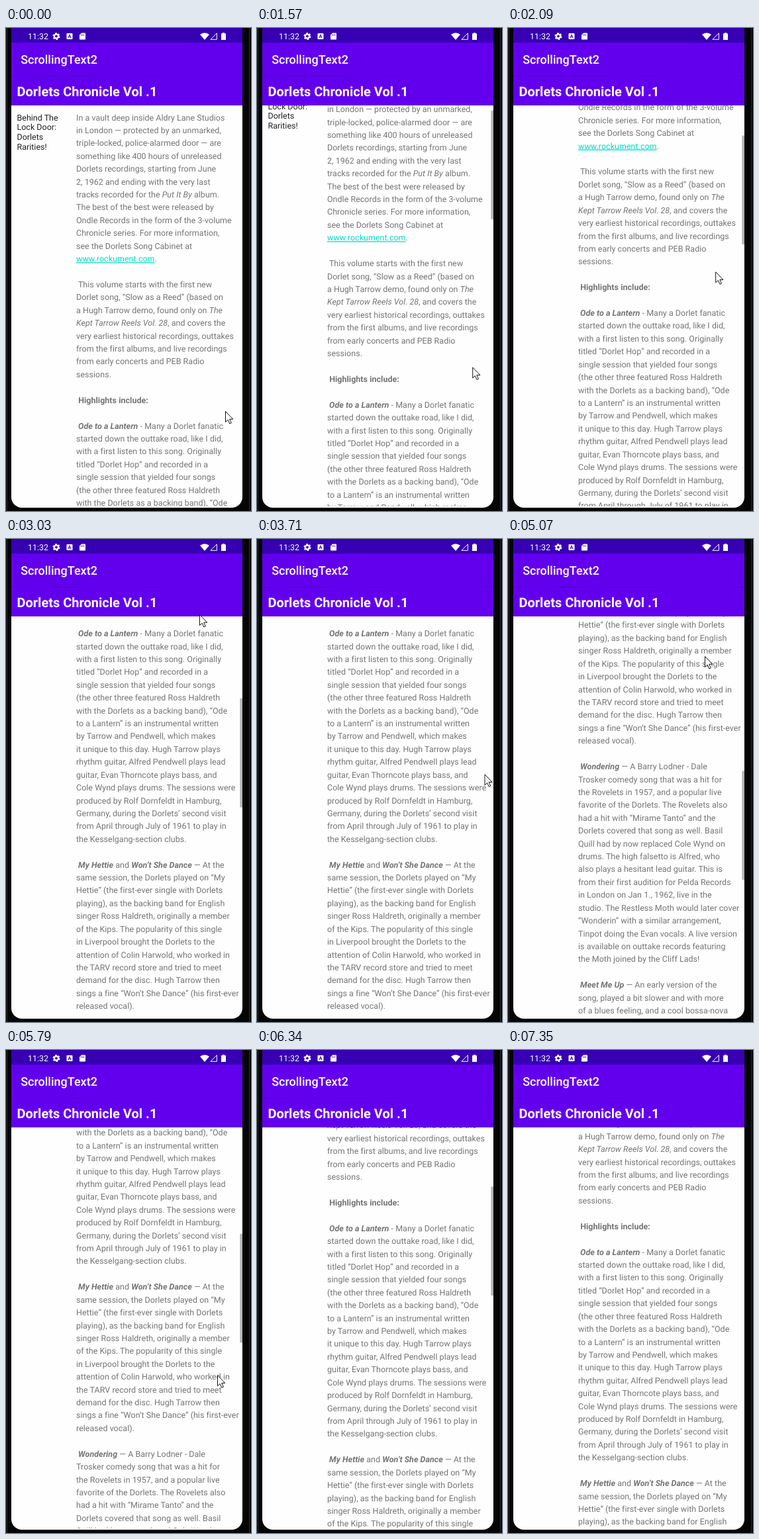
These frames come from a looping animation (370 by 730 pixels, 7890 ms). An HTML page:

```html
<!DOCTYPE html>
<html lang="en">
<head>
<meta charset="utf-8">
<title>Scrolling text</title>
<style>
  html, body { margin: 0; width: 100%; height: 100%; overflow: hidden; background: #050505; }
  svg { display: block; width: 370px; height: 730px; font-family: Roboto, sans-serif; }
  text { white-space: pre; text-rendering: geometricPrecision; }
  .bar { fill: #fff; }
  .body { font-size: 12.5px; letter-spacing: .02px; fill: #757575; }
  .side { font-size: 12.5px; fill: #222; }
  .b { font-weight: 700; }
  .i { font-style: italic; }
  .link { fill: #03dac5; text-decoration: underline; }
</style>
</head>
<body>
<svg viewBox="0 0 370 730">
  <defs>
    <clipPath id="screen"><path d="M8 0H357V709A16 16 0 0 1 341 725H24A16 16 0 0 1 8 709Z"/></clipPath>
    <clipPath id="view"><rect x="8" y="117" width="349" height="606"/></clipPath>
  </defs>

  <rect width="370" height="730" fill="#050505"/>
  <path d="M1.5 0V730M367.5 0V730" stroke="#2b2b2b"/>

  <g clip-path="url(#screen)">
    <rect x="8" width="349" height="730" fill="#fefefe"/>
    <g clip-path="url(#view)">
      <g id="content"></g>
      <rect id="thumb" x="353.4" width="3.6" height="164.5" fill="#b4b4b4"/>
    </g>
    <rect x="8" width="349" height="22" fill="#3700b3"/>
    <rect x="8" y="22" width="349" height="95" fill="#6200ee"/>
    <rect x="8" y="72" width="349" height="1" opacity=".12"/>

    <g class="bar">
      <text x="33" y="17" font-size="12.4">11:32</text>
      <g fill="none" stroke="#fff" transform="translate(76 12.5)">
        <circle r="3.1" stroke-width="2.4"/>
        <circle r="4.7" stroke-width="1.7" stroke-dasharray="2.6 2.32"/>
      </g>
      <rect x="91.5" y="8" width="9" height="9" rx="1"/>
      <text x="96" y="15.2" font-size="7.5" class="b" text-anchor="middle" style="fill:#3700b3">A</text>
      <path d="M114 7.5H119.2Q120 7.5 120 8.3V16.7Q120 17.5 119.2 17.5H111.8Q111 17.5 111 16.7V10.5Z"/>
      <path d="M113.6 9.5v2.2M115.6 9.5v2.2M117.6 9.5v2.2" stroke="#3700b3" stroke-width=".9"/>
      <path d="M293 9.8Q300 4.6 307 9.8L300 18Z"/>
      <path d="M309 17.3H318.4V7.8Z" fill="none" stroke="#fff" stroke-width="1"/>
      <path d="M327 7H330V8.2H332V18H325V8.2H327Z"/>
      <text x="22.2" y="54.2" font-size="18" font-weight="500">ScrollingText2</text>
      <text x="16.5" y="102.6" font-size="20" class="b">Dorlets Chronicle Vol .1</text>
    </g>
  </g>

  <path id="cursor" d="M.5 .5V16.6L4.2 13.2 6.8 19 9.3 17.9 6.7 12.2H11.8Z" fill="#fff" stroke="#111" stroke-width="1" stroke-linejoin="round"/>
</svg>

<script>
const LOOP = 7890, LINE = 19.42, FIRST = 139.5;

// Markup: *bold italic*  _italic_  ^bold^  ~link~
const article = `In a vault deep inside Aldry Lane Studios
in London — protected by an unmarked,
triple-locked, police-alarmed door — are
something like 400 hours of unreleased
Dorlets recordings, starting from June
2, 1962 and ending with the very last
tracks recorded for the _Put It By_ album.
The best of the best were released by
Ondle Records in the form of the 3-volume
Chronicle series. For more information,
see the Dorlets Song Cabinet at
~www.rockument.com~.

 This volume starts with the first new
Dorlet song, “Slow as a Reed” (based on
a Hugh Tarrow demo, found only on _The_
_Kept Tarrow Reels Vol. 28_, and covers the
very earliest historical recordings, outtakes
from the first albums, and live recordings
from early concerts and PEB Radio
sessions.

^ Highlights include:^

* Ode to a Lantern* - Many a Dorlet fanatic
started down the outtake road, like I did,
with a first listen to this song. Originally
titled “Dorlet Hop” and recorded in a
single session that yielded four songs
(the other three featured Ross Haldreth
with the Dorlets as a backing band), “Ode
to a Lantern” is an instrumental written
by Tarrow and Pendwell, which makes
it unique to this day. Hugh Tarrow plays
rhythm guitar, Alfred Pendwell plays lead
guitar, Evan Thorncote plays bass, and
Cole Wynd plays drums. The sessions were
produced by Rolf Dornfeldt in Hamburg,
Germany, during the Dorlets’ second visit
from April through July of 1961 to play in
the Kesselgang-section clubs.

* My Hettie* and *Won’t She Dance* — At the
same session, the Dorlets played on “My
Hettie” (the first-ever single with Dorlets
playing), as the backing band for English
singer Ross Haldreth, originally a member
of the Kips. The popularity of this single
in Liverpool brought the Dorlets to the
attention of Colin Harwold, who worked in
the TARV record store and tried to meet
demand for the disc. Hugh Tarrow then
sings a fine “Won’t She Dance” (his first-ever
released vocal).

* Wondering* — A Barry Lodner - Dale
Trosker comedy song that was a hit for
the Rovelets in 1957, and a popular live
favorite of the Dorlets. The Rovelets also
had a hit with “Mirame Tanto” and the
Dorlets covered that song as well. Basil
Quill had by now replaced Cole Wynd on
drums. The high falsetto is Alfred, who
also plays a hesitant lead guitar. This is
from their first audition for Pelda Records
in London on Jan 1., 1962, live in the
studio. The Restless Moth would later cover
“Wonderin” with a similar arrangement,
Tinpot doing the Evan vocals. A live version
is available on outtake records featuring
the Moth joined by the Cliff Lads!

* Meet Me Up* — An early version of the
song, played a bit slower and with more
of a blues feeling, and a cool bossa-nova`;

const styles = { '*': 'b i', '_': 'i', '^': 'b', '~': 'link' };
const $ = id => document.getElementById(id);
const content = $('content'), thumb = $('thumb'), cursor = $('cursor');

function svg(tag, attrs, parent) {
  const el = document.createElementNS('http://www.w3.org/2000/svg', tag);
  for (const k in attrs) el.setAttribute(k, attrs[k]);
  return parent.appendChild(el);
}

function addLine(line, x, y, cls) {
  const text = svg('text', { x, y, class: cls }, content);
  for (const part of line.split(/([*_^~][^*_^~]+[*_^~])/)) {
    if (!part) continue;
    const style = styles[part[0]];
    svg('tspan', style ? { class: style } : {}, text).textContent = style ? part.slice(1, -1) : part;
  }
}

article.split('\n').forEach((line, n) => addLine(line, 106, FIRST + n * LINE, 'body'));
['Behind The', 'Lock Door:', 'Dorlets', 'Rarities!']
  .forEach((line, n) => addLine(line, 16.5, FIRST + n * 14.9, 'side'));

// Each swipe eases the page to a new offset
const swipes = [
  { start: 1277, end: 3010, scroll: 458.5 },
  { start: 4372, end: 5060, scroll: 859.5 },
  { start: 5210, end: 6413, scroll: 296 }
];
// The pointer wanders, drags up, returns, drags up again, then leaves below
const moves = [
  { start: 120, end: 400, x: 327, y: 573 },
  { start: 500, end: 800, x: 331, y: 582 },
  { start: 1089, end: 3010, x: 292, y: 114 },
  { start: 3300, end: 3700, x: 353, y: 400 },
  { start: 3700, end: 4120, x: 338.5, y: 578.5 },
  { start: 4372, end: 5060, x: 297, y: 177 },
  { start: 5210, end: 6413, x: 343.5, y: 841 }
];

const clamp = v => Math.min(1, Math.max(0, v));
const ease = p => p * p * (3 - 2 * p);
const glide = (from, steps, key, t) => steps.reduce(
  (v, s) => v + (s[key] - v) * ease(clamp((t - s.start) / (s.end - s.start))), from);

// The scrollbar shows with a swipe, waits 300 ms after it and fades in 250 ms
const thumbOpacity = t => Math.max(
  ...swipes.map(s => t < s.start ? 0 : clamp((s.end + 550 - t) / 250)));

// The picture refreshes at a low, steady rate
const REFRESH = 146, PHASE = 96;
const hold = t => Math.floor((t - PHASE) / REFRESH) * REFRESH + PHASE;

function draw(time) {
  const t = hold(time);
  const scroll = glide(0, swipes, 'scroll', t);
  content.setAttribute('transform', `translate(0 ${-scroll})`);
  thumb.setAttribute('y', 116 + scroll * .2728);
  thumb.setAttribute('opacity', thumbOpacity(t));
  cursor.setAttribute('transform', `translate(${glide(331, moves, 'x', t)} ${glide(579, moves, 'y', t)})`);
}

function loop() {
  draw(performance.now() % LOOP);
  requestAnimationFrame(loop);
}
loop();
</script>
</body>
</html>
```
